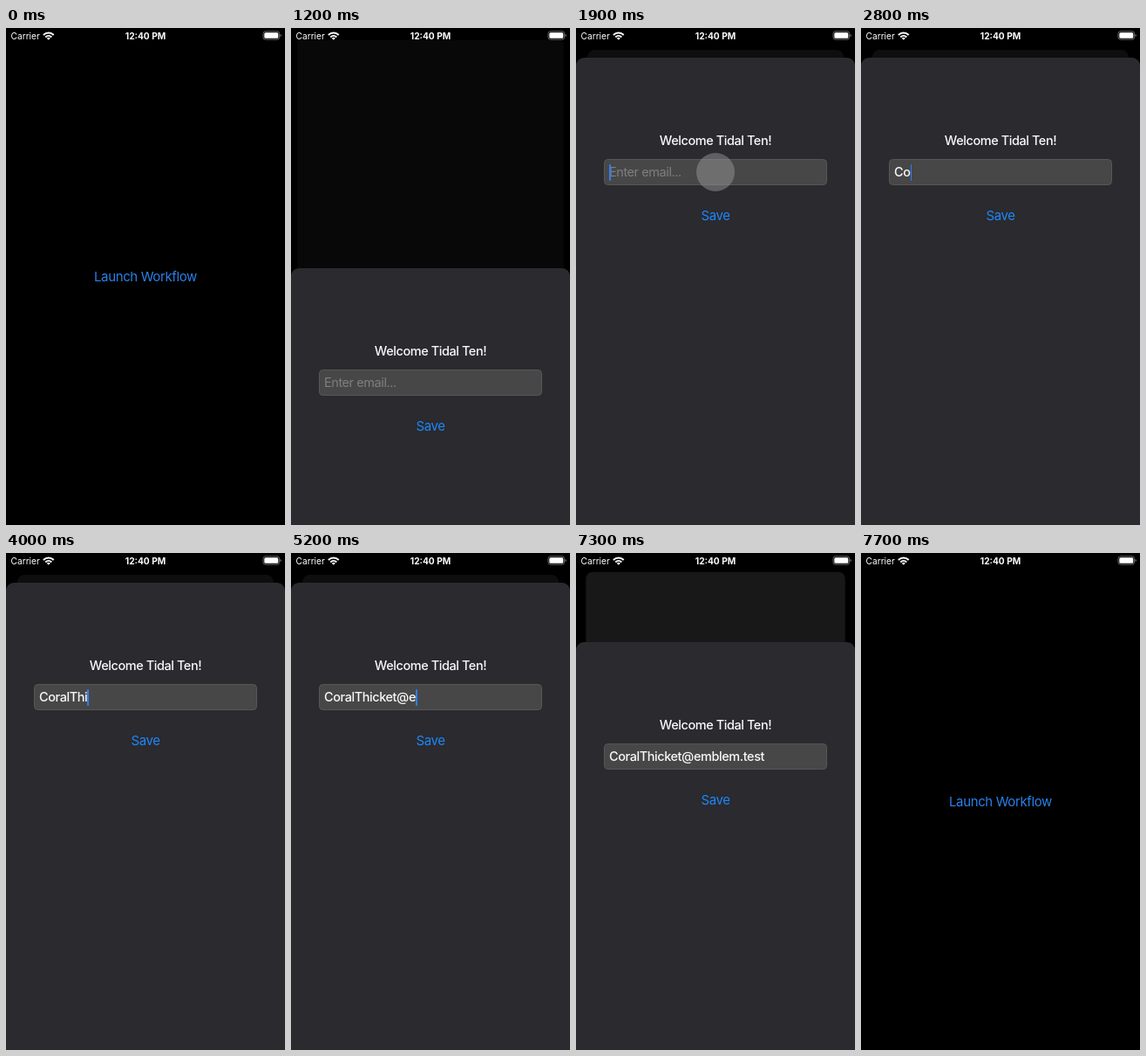
Recreate the animation shown at these times as an HTML page. Size 320 px wide and 569 px high, loop 8 s.

```html
<!DOCTYPE html>
<html lang="en">
<head>
<meta charset="utf-8">
<title>Sign-up sheet</title>
<style>
  html, body { margin: 0; width: 100%; height: 100%; overflow: hidden; background: #000; }
  body { font: 450 14.5px/20px Inter, Roboto, sans-serif; letter-spacing: -.43px; color: #f9f9fa; }
  #stage { position: relative; width: 320px; height: 569px; overflow: hidden; background: #000; }
  #stage > *, #sheet > * { position: absolute; }

  #card { left: 0; top: 0; width: 320px; height: 569px; transform-origin: 50% 0; }
  .button { left: 0; width: 320px; text-align: center; white-space: nowrap;
            font-size: 15px; font-weight: 400; letter-spacing: -.37px; color: #1d86f8; }
  #card .button { position: absolute; top: 275px; color: #2882ea; }

  #sheet { left: 0; top: 0; width: 320px; height: 569px; border-radius: 9px 9px 0 0; background: #2a2a2f; }
  #title { left: 0; top: 84.5px; width: 320px; text-align: center; }
  #field { left: 32px; top: 116px; width: 256px; height: 30px; box-sizing: border-box;
           padding-left: 5px; border: 1px solid #575758; border-radius: 4.5px; background: #474747;
           display: flex; align-items: center; white-space: pre; }
  #field.empty #text { color: #7f7f81; font-weight: 400; }
  #field.empty #caret { position: absolute; left: 5px; }
  #caret { width: 1.8px; height: 19px; border-radius: 1px; background: #2f7df2; }
  #sheet .button { top: 171px; }

  #touch { width: 44px; height: 44px; margin: -22px; border-radius: 50%; background: rgba(150, 150, 150, .5); }

  #status { left: 0; top: 0; }
  #status text { font: 10.2px Inter, Roboto, sans-serif; letter-spacing: 0; fill: #fff; }
  #status .clock { font-weight: 650; text-anchor: middle; }
</style>
</head>
<body>
<div id="stage">
  <div id="card"><div class="button">Launch Workflow</div></div>

  <div id="sheet">
    <div id="title">Welcome Tidal Ten!</div>
    <div id="field"><span id="text"></span><i id="caret"></i></div>
    <div class="button">Save</div>
  </div>

  <div id="touch"></div>

  <svg id="status" width="320" height="20" viewBox="0 0 320 20">
    <text x="5.5" y="12.6">Carrier</text>
    <text class="clock" x="160" y="12.6">12:40 PM</text>
    <g fill="none" stroke="#fff" stroke-width="2">
      <path d="M42.9 8a8.4 8.4 0 0 1 11.8 0"/>
      <path d="M45.3 10.5a5 5 0 0 1 7 0"/>
    </g>
    <path d="M48.8 13.7l-2-2a2.9 2.9 0 0 1 4 0z" fill="#fff"/>
    <rect x="295" y="3.9" width="18.6" height="9.2" rx="2.6" fill="none" stroke="#777" stroke-width=".9"/>
    <rect x="296.3" y="5.2" width="16" height="6.6" rx="1.5" fill="#fff"/>
    <path d="M314.6 7v3q1.1-.4 1.1-1.5T314.6 7z" fill="#888"/>
  </svg>
</div>

<script>
const LOOP = 8000, TICK = 100;
const HEIGHT = 569, REST = 34;
const OPEN = 1087.5, CLOSE = 7262.5;
const EMAIL = 'CoralThicket@emblem.test';

const $ = id => document.getElementById(id);
const card = $('card'), sheet = $('sheet'), field = $('field');
const text = $('text'), caret = $('caret'), touch = $('touch');

const taps = [
  { from: 800, to: 900, y: 285 },
  { from: 1900, to: 2000, y: 165 },
  { from: 6970, to: 7070, y: 215 }
];
const caretOn = [[1900, 2400], [2600, 6400], [6700, 7200]];

// Critically damped spring, 0 to 1
function spring(ms) {
  const x = Math.max(0, ms) * 0.01635;
  return 1 - (1 + x) * Math.exp(-x);
}

function typed(t) {
  if (t < 2600) return 0;
  if (t < 5400) return 1 + Math.floor((t - 2600) / 200);
  return Math.min(EMAIL.length, 15 + Math.floor((t - 5400) / 88));
}

function draw(t) {
  const closing = t >= CLOSE;
  const shown = closing ? 1 - spring(t - CLOSE) : spring(t - OPEN);
  const grey = Math.round((closing ? 28 : 14) * shown);

  card.style.transform = `translateY(${25 * shown}px) scale(${1 - 0.081 * shown})`;
  card.style.borderRadius = `${9 * shown}px`;
  card.style.background = `rgb(${grey}, ${grey}, ${grey})`;

  sheet.style.visibility = shown > 0.01 ? 'visible' : 'hidden';
  // Whole pixels keep the text and the field border crisp
  sheet.style.transform = `translateY(${Math.round(HEIGHT - (HEIGHT - REST) * shown)}px)`;

  const count = typed(t);
  field.className = count ? '' : 'empty';
  text.textContent = count ? EMAIL.slice(0, count) : 'Enter email...';
  caret.style.opacity = caretOn.some(([a, b]) => t >= a && t < b) ? 1 : 0;

  const tap = taps.find(p => t >= p.from && t < p.to);
  touch.style.opacity = tap ? 1 : 0;
  if (tap) {
    touch.style.left = '160px';
    touch.style.top = `${tap.y}px`;
  }
}

const start = performance.now();
function frame() {
  const t = (performance.now() - start) % LOOP;
  draw(Math.floor(t / TICK) * TICK);
  requestAnimationFrame(frame);
}
frame();
</script>
</body>
</html>
```
